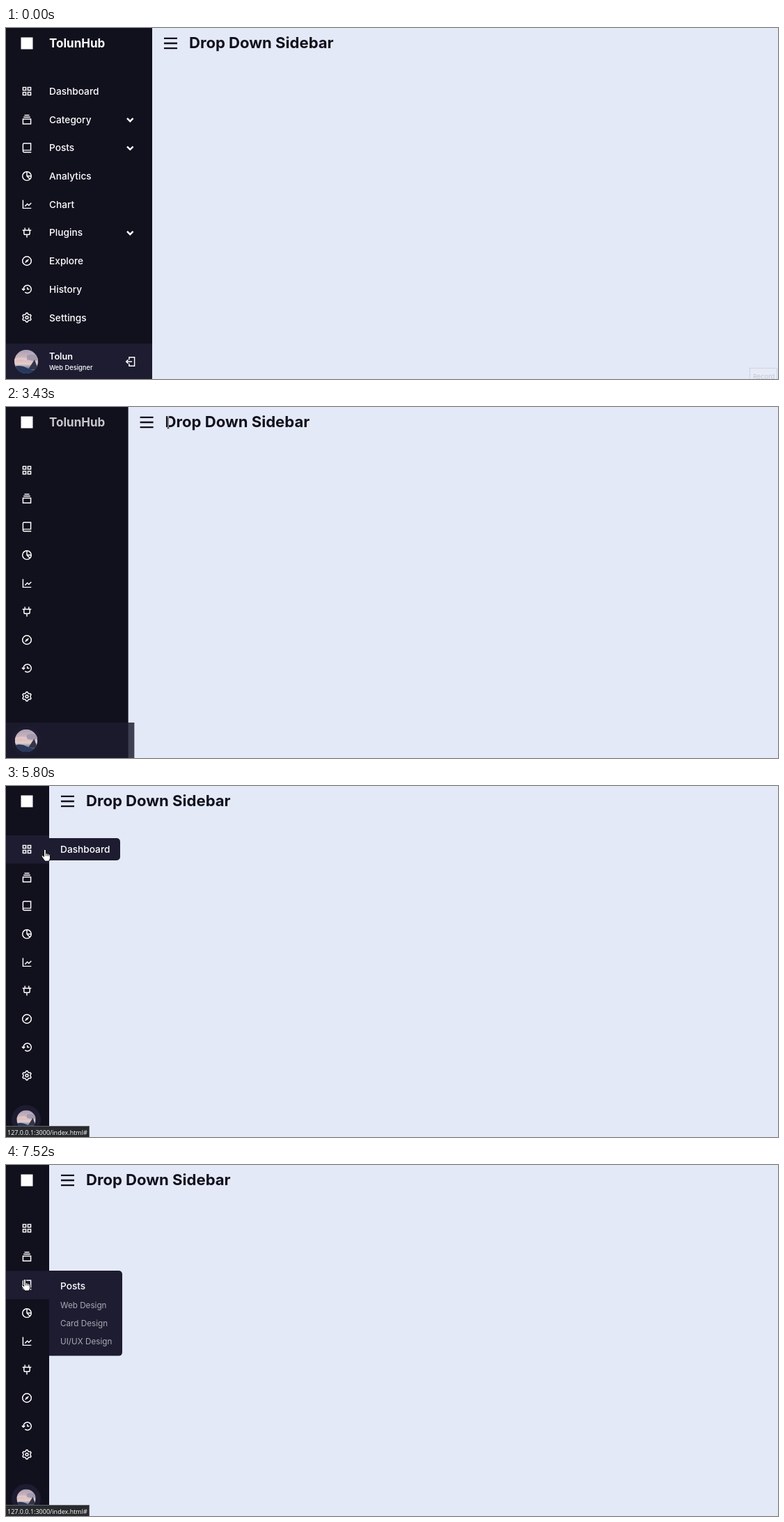
These frames come from a looping animation (1109x505 px, 8 s). An HTML page:

```html
<!DOCTYPE html>
<html lang="en">
<head>
<meta charset="utf-8">
<title>Drop Down Sidebar</title>
<style>
  html, body { margin: 0; width: 100%; height: 100%; overflow: hidden; background: #e4e9f7; }
  svg { display: block; width: 1109px; height: 505px; font-family: Inter, sans-serif; }
  text { fill: #fff; }
  .link { font-size: 13.7px; font-weight: 500; }
  .sub { font-size: 11.7px; opacity: .62; }
  .line { fill: none; stroke: #fff; stroke-width: 2.1; }
  .solid { fill: #fff; }
  .cursor { fill: #fff; stroke: #000; stroke-linejoin: round; }
  #ibeam { fill: none; stroke: #fff; mix-blend-mode: difference; }
</style>
</head>
<body>
<svg id="stage" viewBox="0 0 1109 505"></svg>
<script>
const LOOP = 8000, CLOSE = 3345, OPEN_W = 210, CLOSED_W = 62;
const DARK = '#11101d', PANEL = '#1d1c31';
const rowY = i => 91 + i * 40.69;
const circle = r => `M${12 - r} 12a${r} ${r} 0 1 1 ${2 * r} 0a${r} ${r} 0 1 1 ${-2 * r} 0z`;
const gear = 'M' + Array.from({ length: 24 }, (_, i) => {
  const a = (i - .5) * Math.PI / 12, r = i % 4 < 2 ? 9.3 : 7.2;
  return `${(12 + r * Math.sin(a)).toFixed(2)} ${(12 - r * Math.cos(a)).toFixed(2)}`;
}).join('L') + 'z';

const links = [
  ['Dashboard', 'M4 4h6v6H4zM14 4h6v6h-6zM4 14h6v6H4zM14 14h6v6h-6z'],
  ['Category', 'M4 11h16v10H4zM5 7h14M7 3h10', true],
  ['Posts', 'M4 19V5a2 2 0 0 1 2-2h14v14H6a2 2 0 0 0 0 4h15', true],
  ['Analytics', circle(9) + 'M12 3v9l6 6M12 12h9'],
  ['Chart', 'M4 3v17h17M8 16l5-5 3 3 5-5'],
  ['Plugins', 'M8 2v4M16 2v4M3 7h18M6 7v6a3 3 0 0 0 3 3h6a3 3 0 0 0 3-3V7M12 16v6', true],
  ['Explore', circle(9)],
  ['History', 'M5 12a8 8 0 1 1 3 6.200M2 11l3 3 3-3M13 8v4h4'],
  ['Settings', gear + circle(2.8)]
];

// Hovered rows: start, end, panel top when hidden and shown, size, sub-items
const hovers = [
  { row: 0, from: 4815, to: 5910, top: [65, 75], w: 102, h: 32, items: [] },
  { row: 1, from: 5910, to: 7110, top: [103.4, 111.4], w: 105, h: 122.5, items: ['HTML &amp; CSS', 'Javascript', 'PHP &amp; MySQL'] },
  { row: 2, from: 7110, to: LOOP, top: [144.1, 152.1], w: 105, h: 122.5, items: ['Web Design', 'Card Design', 'UI/UX Design'] }
];

// Pointer hot spot: time, x, y
const path = [
  [70, 1095, 500], [340, 850, 385], [540, 648, 272], [670, 568, 249], [740, 551, 244],
  [1730, 551, 244], [2490, 230, 30], [2690, 230, 30], [2830, 233, 23],
  [3700, 233, 22], [3850, 227, 39], [3990, 228, 58], [4060, 228, 58],
  [4400, 150, 140], [4620, 95, 148], [4830, 56, 91],
  [5800, 56, 91], [5910, 40, 112], [6080, 28, 124],
  [6960, 28, 124], [7110, 27, 153], [7250, 27, 164], [LOOP, 27, 164]
];

const icon = (d, x, y, s = .7) =>
  `<path class="line" d="${d}" transform="translate(${x - 12 * s} ${y - 12 * s}) scale(${s})"/>`;
const label = (s, x, y, cls = 'link') => `<text class="${cls}" x="${x}" y="${y}">${s}</text>`;

const rows = links.map(([, d], i) => icon(d, 30, rowY(i))).join('');
const names = links.map(([name, , more], i) => label(name, 62, rowY(i) + 5) +
  (more ? `<path class="line" style="stroke-width:2.4" d="M174 ${rowY(i) - 1.8}l4.300 4.300 4.300-4.300"/>` : '')).join('');
const glow = hovers.map((h, i) =>
  `<rect id="row${i}" y="${rowY(h.row) - 20}" width="62" height="40.700" fill="${PANEL}"/>`).join('');
const panels = hovers.map((h, i) => `<g id="panel${i}">
  <path fill="${PANEL}" d="M62 0h${h.w - 5}a5 5 0 0 1 5 5v${h.h - 10}a5 5 0 0 1-5 5H62z"/>
  ${label(links[h.row][0], 78, h.items.length ? 27 : 21)}
  ${h.items.map((s, k) => label(s, 78, 53.5 + k * 26, 'sub')).join('')}</g>`).join('');

stage.innerHTML = `
<defs>
  <linearGradient id="sky" x2="0" y2="1">
    <stop offset="0" stop-color="#aaa1b4"/><stop offset=".35" stop-color="#cdb6be"/>
    <stop offset=".6" stop-color="#e6cdc6"/><stop offset=".75" stop-color="#8b8da4"/>
  </linearGradient>
  <clipPath id="round"><circle r="17"/></clipPath>
</defs>
<rect width="1109" height="505" fill="#e4e9f7"/>
<g id="home">
  <path d="M17 14.900h19M17 22h19M17 29.100h19" stroke="${DARK}" stroke-width="2.400"/>
  <text x="53" y="29" style="fill:${DARK};font-size:22.100px;font-weight:700">Drop Down Sidebar</text>
</g>
<rect id="side" height="505" fill="${DARK}"/>
${glow}
<rect class="solid" x="21.500" y="13.500" width="17" height="17"/>
<text id="brand" x="62" y="28" style="font-size:17px;font-weight:700">TolunHub</text>
${rows}
<path class="solid" d="M33 88l-1.700 3.800L27 94l1.800-4z" transform="translate(0 244.140)"/>
<rect id="profile" y="454" height="51" fill="${PANEL}"/>
<circle cx="29" cy="480" r="21" fill="${PANEL}"/>
<g id="avatar"><g clip-path="url(#round)">
  <rect x="-17" y="-17" width="34" height="34" fill="url(#sky)"/>
  <path d="M-17-4Q-6-8 4-4T17-6v3Q6 0-3-2t-14 2z" fill="#e3c6c4"/>
  <path d="M1-9q8-3 16 1v6q-9 2-16-1z" fill="#a29bb0"/>
  <path d="M-17 7q10-3 18 2t16 1v8h-34z" fill="#25395e"/>
  <path d="M3 11L12-3l5 14z" fill="#30354a"/>
</g></g>
<g id="names">
  ${names}
  <text x="62" y="477" style="font-size:12.700px;font-weight:600">Tolun</text>
  <text x="62" y="492" style="font-size:9.300px;font-weight:500">Web Designer</text>
  ${icon('M9 8V3h11v18H9v-5M15 12H3M7 8l-4 4 4 4', 179, 480, .7)}
</g>
${panels}
<g id="record">
  <rect x="1068.500" y="489.500" width="39" height="20" fill="#e7ebf6" stroke="#ced3e0"/>
  <text x="1073" y="505" style="fill:#c2c7d5;font-size:9.300px">Record</text>
</g>
<g id="status">
  <rect x="-.5" y="489.500" width="120" height="16" fill="#292a2d" stroke="#606368"/>
  <text x="2" y="501.500" style="font:9px 'Open Sans',sans-serif">127.0.0.1:3000/index.html#</text>
</g>
<path id="arrow" class="cursor" d="M.5.5v13.500l3-2.800 2.200 5 2.200-1-2.200-4.800h4z"/>
<g id="hand"><g class="cursor" transform="translate(-5.400 -.500)">
  <path d="M4 11V2a1.400 1.400 0 0 1 2.800 0v4.500c1-.8 2-.4 2.300.5 1-.6 1.900-.2 2.100.7 1-.4 1.800.1 1.800 1.200v4.100c0 2-1.200 3-1.500 4.500H5.300C4.500 15.500 1.500 12.500.6 10.400c-.3-1.200 1.200-1.700 2-.8z"/>
  <path d="M6.800 6.500v3.500M9.100 7v3M11.200 7.700v2.500" stroke-width=".8"/>
</g></g>
<path id="ibeam" d="M-1.500-8.500h1l.500 1 .5-1h1M0-8v16M-1.500 8.500h1l.500-1 .5 1h1"/>`;

const el = id => document.getElementById(id);
const set = (id, attrs) => { for (const k in attrs) el(id).setAttribute(k, attrs[k]); };
const clamp = v => Math.min(1, Math.max(0, v));
const mix = (a, b, p) => a + (b - a) * p;

// CSS "ease": cubic-bezier(.25, .1, .25, 1)
function ease(v) {
  const x = clamp(v);
  let lo = 0, hi = 1;
  for (let i = 0; i < 20; i++) {
    const s = (lo + hi) / 2;
    if (.75 * s * (1 - s) + s ** 3 < x) lo = s; else hi = s;
  }
  return .3 * lo * (1 - lo) ** 2 + 3 * lo * lo * (1 - lo) + lo ** 3;
}

function pointerAt(t) {
  const i = Math.max(1, path.findIndex(k => k[0] > t));
  const [a, b] = [path[i - 1], path[i]];
  const p = clamp((t - a[0]) / (b[0] - a[0]));
  return [mix(a[1], b[1], p), mix(a[2], b[2], p)];
}

function draw(t) {
  const fold = ease((t - CLOSE) / 500), lag = ease((t - CLOSE - 14) / 500);
  const width = mix(OPEN_W, CLOSED_W, fold);
  set('side', { width });
  set('home', { transform: `translate(${width} 0)` });
  set('brand', { opacity: 1 - fold });
  set('names', { opacity: t < CLOSE ? 1 : 0 });
  set('profile', { width: mix(OPEN_W, CLOSED_W, lag), opacity: 1 - lag });
  set('avatar', { transform: `translate(29 480) scale(${mix(1, .8, fold)})` });

  hovers.forEach((h, i) => {
    const p = ease((t - h.from) / 400);
    set('row' + i, { opacity: p * (1 - ease((t - h.to) / 400)) });
    set('panel' + i, { opacity: t < h.to ? p : 0, transform: `translate(0 ${mix(...h.top, p)})` });
  });

  set('record', { opacity: 1 - clamp((t - 70) / 140) });
  set('status', { opacity: clamp((t - 4900) / 150) });

  const [x, y] = pointerAt(t);
  const shape = t < 70 ? '' : t >= 4800 ? 'hand' : t >= 3410 && t < 3770 ? 'ibeam' : 'arrow';
  for (const id of ['arrow', 'hand', 'ibeam'])
    set(id, { transform: `translate(${x} ${y})`, visibility: id === shape ? 'visible' : 'hidden' });
}

const start = performance.now();
function tick() {
  draw((performance.now() - start) % LOOP);
  requestAnimationFrame(tick);
}
tick();
</script>
</body>
</html>
```
